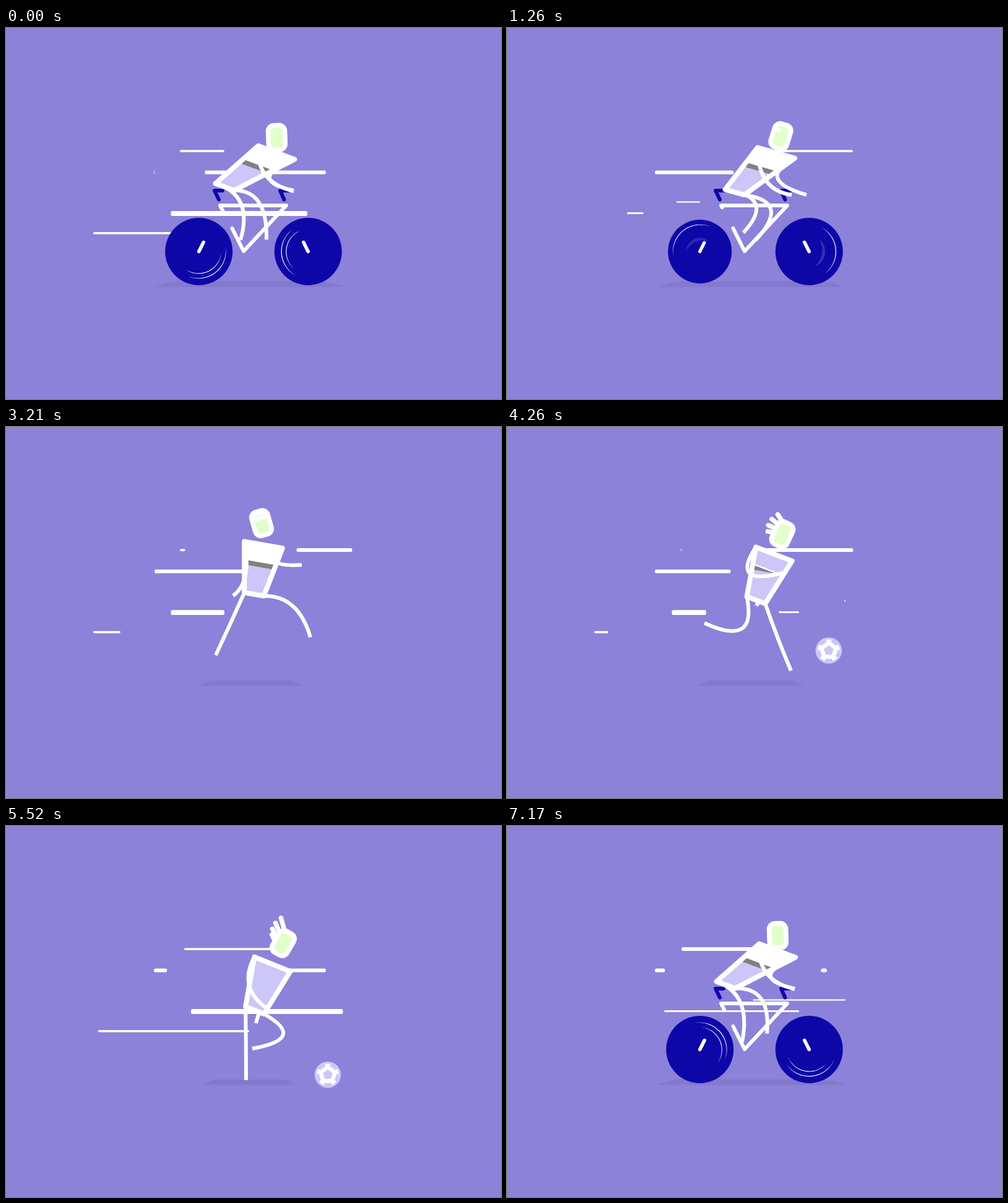
Animation, 800 px wide and 600 px high, one loop 7.2 s. Source, as an HTML page with a canvas:

```html
<!DOCTYPE html>
<html>
<head>
<meta charset="utf-8">
<style>
html, body { margin: 0; width: 100%; height: 100%; overflow: hidden; background: #8c82da; }
canvas { display: block; }
</style>
</head>
<body>
<canvas id="stage" width="800" height="600"></canvas>
<script>
const ctx = document.getElementById('stage').getContext('2d');
const LOOP = 7200, TAU = Math.PI * 2, DEG = Math.PI / 180;
const WHITE = '#fff', LILAC = '#cdc6f8', BLUE = '#0e07a8', GREEN = '#e0ffca', GRAY = '#808080';

const clamp = v => Math.max(0, Math.min(1, v));
const ramp = (t, a, b) => clamp((t - a) / (b - a));
const easeOut = k => 1 - (1 - clamp(k)) ** 2;
const smooth = k => k * k * (3 - 2 * k);
const polar = (r, a) => [r * Math.cos(a), r * Math.sin(a)];

// Blends numbers, lists and objects of the same shape.
function mix(a, b, k) {
  if (typeof a === 'number') return a + (b - a) * k;
  if (Array.isArray(a)) return a.map((v, i) => mix(v, b[i], k));
  return Object.fromEntries(Object.keys(a).map(key => [key, mix(a[key], b[key], k)]));
}
// Pair of [time, value] keys around t, and how far t is between them.
function between(keys, t) {
  let i = 1;
  while (i < keys.length - 1 && keys[i][0] < t) i++;
  const [t0, a] = keys[i - 1], [t1, b] = keys[i];
  return [a, b, ramp(t, t0, t1)];
}

// Arms and legs are [bend x, y, end x, y]; they start at the torso's corners.
const ride = {
  chest: [437, 201.5], hip: [353.5, 257], tilt: 20.5, head: [437.5, 177.3], nod: -2, shadow: 155,
  front: [403, 249, 465, 264], back: [386, 246, 465, 263],
  legA: [400, 270, 379, 343], legB: [423, 262, 421, 342]
};
const lean = {
  chest: [435, 202], hip: [368, 265.5], tilt: 16, head: [442.5, 175], nod: 17, shadow: 152,
  front: [405, 262, 460, 270], back: [400, 245, 484, 270],
  legA: [436, 273, 382, 331], legB: [460, 280, 402, 343]
};
const pass = {
  chest: [394, 199.5], hip: [402, 280.5], tilt: -5, head: [385, 167], nod: -23, shadow: 56,
  front: [324, 243, 390, 291], back: [408, 255, 444, 289],
  legA: [411, 336, 436, 391], legB: [424, 356, 342, 320]
};
const push = {
  chest: [416, 190.5], hip: [401, 270.5], tilt: 10, head: [413, 155.5], nod: -16, shadow: 83,
  front: [398, 250, 367, 273], back: [412, 227, 478, 223],
  legA: [362, 320, 339, 369], legB: [472, 272, 492, 340]
};
const kick = {
  chest: [431.5, 205.5], hip: [402.5, 280], tilt: 21, head: [445, 173.5], nod: 25, shadow: 86,
  front: [360, 258, 446, 236], back: [425, 255, 403, 289],
  legA: [405, 357, 319, 317], legB: [436, 340, 459, 394]
};
const juggle = {
  chest: [430.5, 223.5], hip: [402, 298], tilt: 22, head: [448, 189.5], nod: 30, shadow: 74,
  front: [374, 262, 423, 296], back: [412, 280, 404, 319],
  legA: [388, 350, 388, 411], legB: [488, 344, 398, 360]
};
const swap = p => ({ ...p, legA: p.legB, legB: p.legA });

const running = [pass, push, swap(pass), swap(push)];
const playing = [swap(kick), push, kick, swap(push)];
const moves = [[0, ride], [1120, ride], [1260, lean]];
for (let n = -3; n <= 18; n++) {
  const time = n < 5 ? 2100 + 222 * n : 3210 + 210 * (n - 5);
  const gait = n < 8 ? running : playing;
  moves.push([time, n === 16 ? juggle : gait[(n + 4) % 4]]);
}
moves.push([6260, push], [6620, ride], [LOOP, ride]);

// Each streak's left edge shoots out over `lead`, its right edge follows after `delay`.
const streaks = [];
const streak = (y, w, right, start, lead = .31, delay = .14) =>
  streaks.push({ y, w, right, start, lead, delay });
streak(199, 3.5, 559, .64);
streak(199, 6, 559.5, .096);
streak(233.5, 6, 517, .86, .31, .19);
streak(233.5, 6, 517, .386, .31, .19);
streak(281.3, 2.2, 547, .199, .6, .25);
streak(300, 8, 544.5, .862, .06, .09);
streak(299.5, 3.2, 472, .177, .4, .233);
streak(331.7, 3.4, 419, .86, .05, .02);
const pace = [[0, 0], [1260, 1.72], [2100, 2.86], [3210, 4.15], [4260, 5.2], [5520, 6.9],
  [7170, 9.39], [LOOP, 9.43]];

function stroke(color, w, cap = 'butt') {
  ctx.strokeStyle = color;
  ctx.lineWidth = w;
  ctx.lineCap = cap;
  ctx.lineJoin = 'round';
  ctx.stroke();
}
function fill(color) {
  ctx.fillStyle = color;
  ctx.fill();
}
function poly(...p) {
  ctx.beginPath();
  for (let i = 0; i < p.length; i += 2) ctx.lineTo(p[i], p[i + 1]);
}
function box(x, y, w, h, r, color) {
  ctx.beginPath();
  ctx.roundRect(x, y, w, h, r);
  fill(color);
}
function disc(x, y, r, color) {
  ctx.beginPath();
  ctx.arc(x, y, r, 0, TAU);
  fill(color);
}
function limb(from, bendAndEnd) {
  ctx.beginPath();
  ctx.moveTo(...from);
  ctx.quadraticCurveTo(...bendAndEnd);
  stroke(WHITE, 6);
}
function trimmed(k, length, color, ...p) {
  if (k <= 0) return;
  poly(...p);
  ctx.setLineDash([length * k, 999]);
  stroke(color, 6, 'round');
  ctx.setLineDash([]);
}

function drawShadow(half) {
  const inset = half * .24, l = 394.5 - half, r = 394.5 + half;
  ctx.beginPath();
  ctx.moveTo(l, 418.7);
  ctx.quadraticCurveTo(l + inset * .6, 411.5, l + inset, 409.7);
  ctx.lineTo(r - inset, 409.7);
  ctx.quadraticCurveTo(r - inset * .6, 411.5, r, 418.7);
  fill('#8379cd');
}

function drawStreaks(t) {
  const phase = mix(...between(pace, t));
  for (const { y, w, right, start, lead, delay } of streaks) {
    const age = (phase - start + 9) % 1;
    const x0 = right - 278 * easeOut(age / lead);
    const x1 = right - 278 * easeOut((age - delay) / .45);
    if (x1 - x0 > .3) box(x0, y - w / 2, x1 - x0, w, Math.min(w / 2, 2.5), WHITE);
  }
}

// Thin tapered glint along a rim.
function glint(r, angle, thick) {
  const n = 24, half = 1.08;
  ctx.beginPath();
  for (let i = 0; i <= 2 * n; i++) {
    const u = i <= n ? i / n * 2 - 1 : 3 - i / n * 2;
    const inward = i <= n ? 0 : thick * (1 - u * u);
    ctx.lineTo(...polar(r - inward, angle + u * half));
  }
  fill(WHITE);
}

function drawWheel(t, x, dir, k, angle, fade) {
  if (k <= 0) return;
  const spin = angle + t * 3 * DEG;
  ctx.save();
  ctx.translate(x, 361.5);
  disc(0, 0, 54.5 * k, BLUE);
  ctx.globalAlpha = k;
  glint(43.8, spin, 1.2);
  ctx.globalAlpha = fade === 1 ? 1 : .22 * fade;
  glint(36 * fade, spin + .25, fade === 1 ? 1.1 : 5);
  ctx.globalAlpha = 1;
  poly(0, 0, 7.5 * dir * k, -15 * k);
  stroke(WHITE, 5.5 * k, 'round');
  ctx.restore();
}

function drawBike(t) {
  const shown = (out, back) => 1 - ramp(t, out, out + 200) + ramp(t, back, back + 200);
  const fade = out => 1 - ramp(t, out, out + 235) + ramp(t, 6500, 6700);
  trimmed(shown(1265, 6400), 30, BLUE, 344, 277.5, 337, 263, 350, 263);
  trimmed(shown(1265, 6400), 30, BLUE, 449.5, 277.5, 443, 263, 458, 263);
  drawWheel(t, 311.7, 1, shown(1250, 6350), .85, fade(1170));
  drawWheel(t, 488.3, -1, shown(1270, 6400), 3, fade(1195));
  trimmed(shown(1255, 6400), 261, WHITE, 365.5, 324, 384, 361, 453, 287, 346, 287, 351.5, 298);
}

function corners({ chest, hip, tilt }) {
  const edge = ([x, y], half) => {
    const [dx, dy] = polar(half, tilt * DEG);
    return [[x - dx, y - dy], [x + dx, y + dy]];
  };
  return [...edge(chest, 31.3), ...edge(hip, 16)];
}

function drawTorso([sl, sr, hl, hr], t) {
  const outline = [...sl, ...sr, ...hr, ...hl];
  const left = k => mix(sl, hl, k), right = k => mix(sr, hr, k);
  poly(...outline);
  ctx.closePath();
  fill(LILAC);
  // The shirt wipes down to its hem, then the hem wipes away to the left.
  const off = ramp(t, 3900, 4380) - ramp(t, 6250, 6600);
  if (off < 1) {
    const top = Math.min(.35, .43 * off), reach = 1 - Math.max(0, off - .68) / .32;
    const hem = .355 + .095 * ramp(reach, .78, 1);
    poly(...left(top), ...right(top), ...right(.36), ...left(.36));
    fill(WHITE);
    poly(...left(.355), ...mix(left(.355), right(.355), reach),
      ...mix(left(hem), right(hem), reach), ...left(.45));
    fill(GRAY);
  }
  poly(...outline);
  ctx.closePath();
  stroke(WHITE, 8);
}

function drawHair(t) {
  const grown = ramp(t, 3750, 4100) - ramp(t, 6150, 6400);
  if (grown <= 0) return;
  const sway = Math.sin(TAU / 4 * (t - 4260) / 180) ** 2;
  for (let i = 0; i < 4; i++) {
    const root = polar(16 - i, -(77 + 31 * i) * DEG);
    const angle = mix(103, 95, sway) + i * mix(22, 16, sway);
    const tip = polar(mix(33, 41, sway) - i * mix(3, 6, sway), -angle * DEG);
    poly(...root, ...mix(root, tip, grown));
    stroke(WHITE, 7.5, 'round');
  }
}

function drawHead({ head, nod }, t) {
  const band = ramp(t, 1230, 1410) - ramp(t, 3500, 3800);
  const top = -15.7 + 2.5 * band;
  ctx.save();
  ctx.translate(...head);
  drawHair(t);
  ctx.rotate(nod * DEG);
  box(-17.3, -23.6, 34.6, 47.2, 13, WHITE);
  box(-9.7, top, 19.4, 16.2 - top, 6, GREEN);
  if (band > 0) {
    poly(-9, -8.5, -9 + 18 * band, -8.5);
    stroke(WHITE, 6.5, 'round');
  }
  ctx.restore();
}

// Drops in, hops to and fro, then is shot away to the upper left.
function ballAt(t) {
  const x = 560 - 40 * Math.cos(TAU * (t - 4260) / 1260);
  const hop = 41 * Math.abs(Math.sin(Math.PI * (t - 5520) / 504));
  const drop = 1.7 * Math.max(0, 4080 - t);
  return mix([x, 402.5 - hop - drop], [-25, 48], ramp(t, 5760, 6090));
}

function drawBall(t) {
  if (t < 3800 || t > 6090) return;
  const [x, y] = ballAt(t);
  ctx.save();
  ctx.translate(x, y);
  ctx.rotate((x - 520) / 21);
  disc(0, 0, 21.3, LILAC);
  disc(0, 0, 18, WHITE);
  poly(...[0, 1, 2, 3, 4].flatMap(i => polar(8.3, i * TAU / 5 - TAU / 4)));
  fill(LILAC);
  for (let i = 0; i < 5; i++) {
    const a = TAU / 4 + i * TAU / 5;
    ctx.beginPath();
    ctx.arc(0, 0, 16.3, a - .36, a + .36);
    stroke(LILAC, 5.5);
  }
  ctx.restore();
}

// Feet circle with the pedals; a lower foot pulls its knee back.
function pedal(pose, t) {
  if (pose !== ride) return pose;
  const [dx, dy] = polar(21, TAU * t / 600);
  const turn = ([kx, ky, fx, fy], side) =>
    [kx - .7 * side * dy, ky + .3 * side * dy, fx + side * (dx - 21), fy + side * dy];
  return { ...pose, legA: turn(pose.legA, -1), legB: turn(pose.legB, 1) };
}

function draw(t) {
  const [from, to, k] = between(moves, t);
  const pose = mix(pedal(from, t), pedal(to, t), smooth(k));
  const body = corners(pose);
  const [sl, sr, hl, hr] = body;

  ctx.fillStyle = '#8c82da';
  ctx.fillRect(0, 0, 800, 600);
  drawShadow(pose.shadow);
  drawStreaks(t);
  drawBike(t);
  limb(sr, pose.back);
  limb(hl, pose.legA);
  limb(hr, pose.legB);
  drawTorso(body, t);
  limb(sl, pose.front);
  drawHead(pose, t);
  drawBall(t);
}

const start = performance.now();
function tick() {
  draw((performance.now() - start) % LOOP);
  requestAnimationFrame(tick);
}
tick();
</script>
</body>
</html>
```
